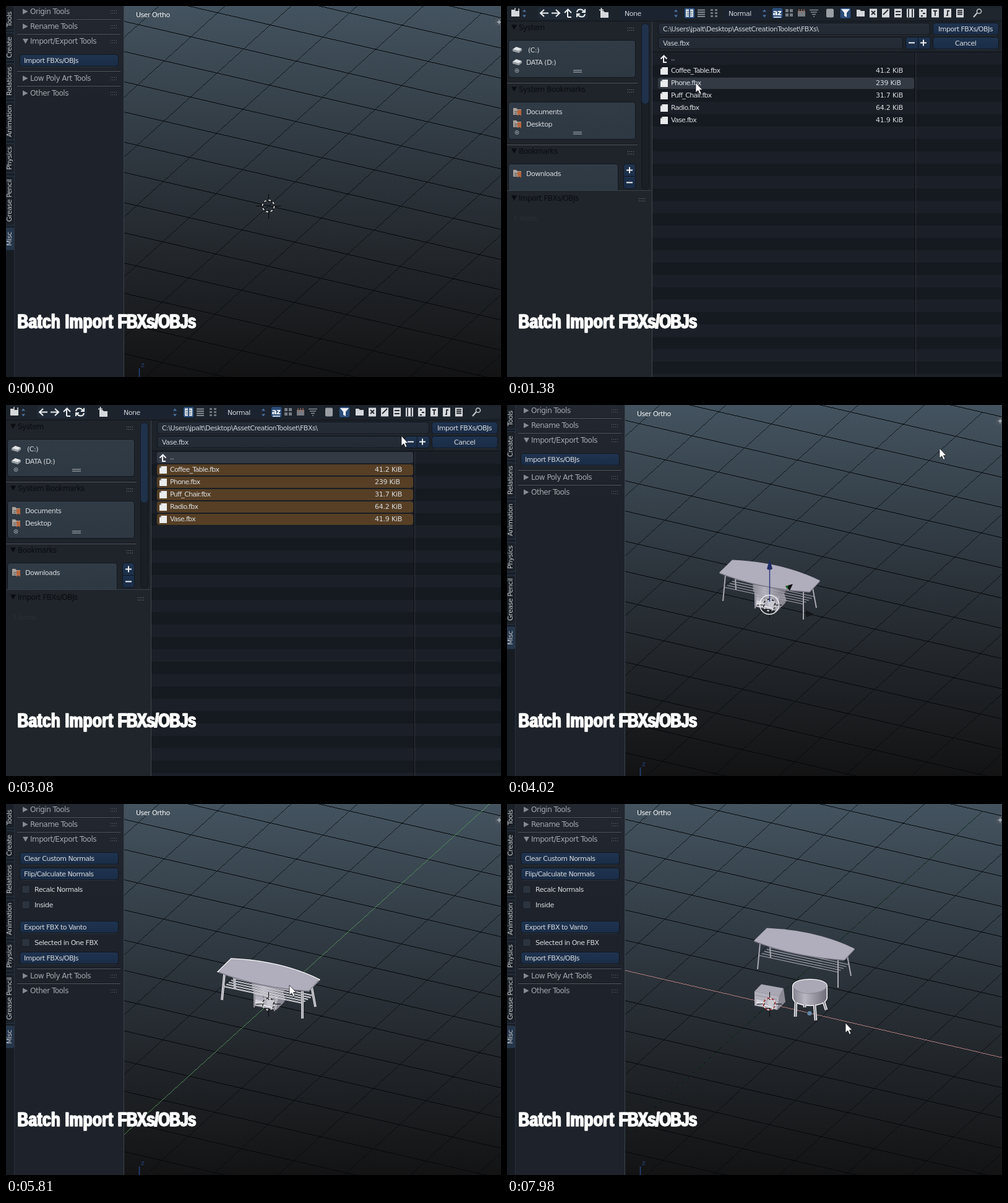
Recreate the animation shown at these times as an HTML page. Size 800 by 600 pixels, loop 8 s.

```html
<!DOCTYPE html>
<html lang="en">
<head>
<meta charset="utf-8">
<title>Batch import</title>
<style>
html, body { margin: 0; width: 100%; height: 100%; overflow: hidden; background: #1d222a; }
svg { display: block; width: 800px; height: 600px; }
text { font-family: "DejaVu Sans", sans-serif; white-space: pre; }
#title text { font-family: "Liberation Sans", sans-serif; font-weight: bold; }
</style>
</head>
<body>
<svg id="stage" viewBox="0 0 800 600" xmlns="http://www.w3.org/2000/svg"></svg>
<script>
const LOOP = 8000, TICK = 77.5;
const stage = document.getElementById('stage');

// ---------- markup helpers ----------
const rect = (x, y, w, h, fill, more = '') =>
  `<rect x="${x}" y="${y}" width="${w}" height="${h}" fill="${fill}" ${more}/>`;
const path = (d, fill, more = '') => `<path d="${d}" fill="${fill}" ${more}/>`;
const line = (d, color, w = 1, more = '') => path(d, 'none', `stroke="${color}" stroke-width="${w}" ${more}`);
const text = (x, y, s, fill = '#d8dbdf', size = 11, gap = -0.5, more = '') =>
  `<text x="${x}" y="${y}" fill="${fill}" font-size="${size}" letter-spacing="${gap}" ${more}>${s}</text>`;
const group = (id, body, more = '') => `<g id="${id}" ${more}>${body}</g>`;
const range = (n, f) => Array.from({ length: n }, (_, i) => f(i)).join('');
const fade = (id, ...stops) => `<linearGradient id="${id}" x2="0" y2="1">` +
  stops.map((c, i) => `<stop offset="${i / (stops.length - 1)}" stop-color="${c}"/>`).join('') + '</linearGradient>';

const button = (x, y, w, label, id = '', tx = 7) =>
  rect(x + .5, y + .5, w - 1, 19, 'url(#btn)', `rx="4" stroke="#10161f" ${id && `id="${id}"`}`) +
  line(`M${x + 4} ${y + 20.5}h${w - 8}`, '#2c333c') + text(x + tx, y + 14, label);
const grip = (x, y, c = '#6b7078') => range(8, i => rect(x + (i % 4) * 3, y + (i >> 2) * 4, 1, 1, c));
const fold = (x, y, open, c) => path(open ? `M${x} ${y - 4}h9l-4.5 8z` : `M${x} ${y - 4.5}v9l8.5-4.5z`, c);

// ---------- viewport ----------
const C = [424.5, 323.2], U = [85.15, 19.7], V = [43, -38.92];
const at = (a, b) => `${C[0] + a * U[0] + b * V[0]} ${C[1] + a * U[1] + b * V[1]}`;
// width = cosine of the slope, so each column gets exactly one pixel
const hair = (d, color, [dx, dy], more = '') =>
  line(d, color, Math.abs(dx) / Math.hypot(dx, dy), `shape-rendering="crispEdges" ${more}`);
const grid = () => hair(range(17, i => `M${at(-8, i - 8)}L${at(8, i - 8)}`), '#050709', U) +
  hair(range(17, i => `M${at(i - 8, -8)}L${at(i - 8, 8)}`), '#050709', V);

function tabs() {
  const list = [['Tools', -8, 39, 34], ['Create', 43, 88, 84], ['Relations', 93, 150, 145], ['Animation', 155, 217, 212],
    ['Physics', 222, 270, 265], ['Grease Pencil', 275, 355, 349], ['Misc', 359, 394, 388]];
  return rect(0, 0, 14, 600, '#171c23') + list.map(([s, a, b, y]) =>
    rect(-4, a, 17.5, b - a, s === 'Misc' ? '#25364b' : '#1b2027', 'rx="3" stroke="#2b3d51"') +
    text(0, 0, s, '#c3c7cc', 11, -.45, `transform="translate(9 ${y}) rotate(-90)"`)).join('') +
    line('M13.5 0V600', '#2a323d');
}

const header = (y, s, open) => fold(27, y - 4, open, '#868b92') + text(39, y, s, '#a3a8ae', 12) + grip(169, y - 6);
const rule = y => rect(18, y, 167, 1, '#565b62') + rect(18, y - 1, 167, 1, '#12161c');
const check = (y, s) => rect(25.5, y - 6.5, 13, 13, '#2b333e', 'rx="3" stroke="#151a21"') + text(46, y + 4, s);

const table = () => {
  const legs = 'M353 275L349 317M369 280L370 299M479 301V347M494 296L500 328';
  const rods = range(5, i => `M${352 + 4 * i} ${295 - 3.3 * i}L${479 + 4.5 * i} ${322 - 3 * i}`);
  const top = 'M343 271L364 250.5Q445 254 506 284L489 302Q405 296 343 271Z';
  return group('tableGlow', line(legs, '#fff', 3.6) + line(rods, '#fff', 1.8) + path(top, '#fff', 'stroke="#fff" stroke-width="2.4"')) +
    line(rods, '#a5a4ae', 1.1) + line(legs, '#aaa8b3', 2) +
    path(top, '#777581', 'transform="translate(0 1.5)"') + path(top, '#b0adbc');
};

const chair = () => {
  const legs = 'M402 303L401 329M416 306V314M432 309L434 335M446 302L451 318';
  const body = 'M397.500 279C399 266 450 266 451.500 279V299C448 314 401 314 397.500 299Z';
  return group('chairGlow', line(legs, '#fff', 4.6) + path(body, '#fff', 'stroke="#fff" stroke-width="3"')) +
    line(legs, '#8e8c97', 2.2) + path(body, 'url(#drum)') +
    path('M397.500 279C399 266 450 266 451.500 279C449 294 400 294 397.500 279Z', '#aba8b6') +
    line('M398 281C402 295 447 295 451 281', '#8b8994');
};

const radio = () =>
  path('M400 303L411 291.500L447 298L440 311Z', '#aaa7b4') + path('M440 311L447 298L450 320L437 333Z', '#8b8994') +
  path('M400 303L440 311L437 333L400 326Z', '#b4b2bd') + path('M403 316L416 319V325L403 322Z', '#d3d2da') +
  line('M402 309L436 316', '#8f8d98') + line('M403 322L434 330', '#f0f0f3', 1.5) +
  `<ellipse cx="427" cy="321" rx="6" ry="6" fill="#c9c8d1"/>`;

const gizmo = () => line('M424.500 318V266', '#25357f', 1.4) + path('M424.500 250L429 265Q424 268 420 265Z', '#202c66') +
  path('M450 293L462 289.500L457 300Z', '#0a0d0b') + path('M450 293L455 292L453 298Z', '#1c6b24') +
  path('M483 332L497 339L483 343Z', '#14161a') + `<circle cx="424" cy="323" r="15.5" fill="none" stroke="#f2f2f2" stroke-width="1.4"/>`;

const pivot = () => line('M404 323.500h13M431 323.500h13M424.500 304v13M424.500 330v14', '#06080a') +
  `<circle cx="424" cy="323.500" r="9.500" fill="none" stroke="#111" stroke-width="1.3"/>
   <circle id="ring" cx="424" cy="323.500" r="9.500" fill="none" stroke="#b02a2a" stroke-width="1.3"/>
   <circle cx="424" cy="323.500" r="9.500" fill="none" stroke="#fff" stroke-width="1.4" stroke-dasharray="3.730"/>`;

const scene = () => rect(0, 0, 800, 600, 'url(#sky)') + grid() +
  group('axisDim', hair(`M${at(0, -8)}L${at(0, 8)}`, '#10391a', V, 'stroke-dasharray="9 3"')) +
  group('axisY', hair(`M${at(0, -16)}L${at(0, 16)}`, '#69b56d', V)) +
  group('axisX', hair(`M${at(-8, 0)}L${at(8, 0)}`, '#b57f80', U)) +
  group('things', radio() + group('chair', chair()) + group('table', table())) +
  pivot() + group('gizmo', gizmo()) + `<circle id="origin" cx="424" cy="323.500" r="3.600" fill="#6485a6"/>` +
  text(210, 18, 'User Ortho', '#f4f5f6') + line('M215.500 586V600', '#24447f', 1.6) + text(218, 584, 'z', '#24447f', 11) +
  path('M800 19.500h-6q-4 0-4 4v5q0 4 4 4h6z', '#4a545e') + line('M797 22.500v7M793.500 26h7', '#aeb4ba', 1.6);

const sidePanel = () => rect(0, 0, 190, 600, '#1e232b') + rect(14, 0, 176, 160, 'url(#side)') + line('M190.500 0V600', '#3b434d') +
  tabs() + header(13, 'Origin Tools') + rule(21) + header(37, 'Rename Tools') + rule(45) + header(61, 'Import/Export Tools', true) +
  group('extra', button(22, 78, 160, 'Clear Custom Normals') + button(22, 103, 160, 'Flip/Calculate Normals') +
    check(138, 'Recalc Normals') + check(163, 'Inside') + button(22, 189, 160, 'Export FBX to Vanto') + check(224, 'Selected in One FBX')) +
  group('lower', button(22, 78, 160, 'Import FBXs/OBJs', 'importBtn') + rule(105) + header(121, 'Low Poly Art Tools') +
    rule(129) + header(145, 'Other Tools'));

// ---------- file browser ----------
const files = [['Coffee_Table', '41.2'], ['Phone', '239'], ['Puff_Chair', '31.7'], ['Radio', '64.2'], ['Vase', '41.9']];

const field = (x, y, w, h, s = '') => rect(x + .5, y + .5, w - 1, h - 1, 'url(#field)', 'rx="4" stroke="#10151b"') +
  line(`M${x + 4} ${y + h + .5}h${w - 8}`, '#2c3239') + text(x + 8, y + 14, s, '#cfd3d8');
const upDown = (x, y) => path(`M${x} ${y - 2}l3-4 3 4zM${x} ${y + 3}l3 4 3-4z`, '#4a6f9c');
const lit = x => rect(x - 9, 2.5, 18, 18, '#2b4d79', 'rx="3" stroke="#10161f"');
const page = (x, y, c = '#e9ebed') => path(`M${x + 3} ${y}h9v12h-12v-9z`, c) + path(`M${x + 3} ${y}v3h-3z`, '#8d9299');
const folder = (x, y, c = '#d5d8db') => path(`M${x} ${y}h5l2 2h6v9h-13z`, c);

function toolbar() {
  const arrows = 'M67 11.500H55M60 6l-6 5.500 6 5.500M72 11.500H84M79 6l6 5.500-6 5.500M98 18V6M93 11l5.500-5.500L104 11' +
    'M104 18H98M113 10q1-5 6-4.500 4 .5 6 4M126 5v5h-5M126 13q-1 5-6 4.500-4-.5-6-4M113 18v-5h5';
  const marks = ['M3 8l6 6M9 8l-6 6', 'M2 14l8-8', 'M2 9h8M2 14h8', 'M3 5v13M9 5v13',
    'M3 8h3M6 12h4M3 16h3', 'M3 8h6M6 8v8', 'M4 15h2V8h3', 'M2 7.500h8M2 10.500h8M2 13.500h8'];
  const kinds = folder(565, 6) + marks.map((d, i) => `<g transform="translate(${586 + 20 * i} 0)">` +
    rect(0, 4.5, 12, 14, '#d9dcdf') + line(d, '#23282f', 1.8) + '</g>').join('');
  return rect(0, 0, 800, 24, '#1d232b') + folder(7, 6) + line('M13 3v4M19 4v8', '#cfd3d7', 1.5) + upDown(25, 11.5) +
    rect(50, 2, 80, 19, '#202a36', 'rx="4"') + line(arrows, '#eceef0', 2) + folder(151, 8) + line('M149 6.500h7M152.500 3v7', '#eceef0', 1.6) +
    rect(183, 2, 97, 19, '#1b2330', 'rx="4"') + text(190, 16, 'None', '#d0d4d9') + upDown(270, 11.5) +
    lit(295) + range(2, i => rect(289 + 7 * i, 5.5, 5, 12, '#eceef0')) + line('M290 8.500h10M290 11.500h10M290 14.500h10', '#34506f') +
    line('M308 6.500h12M308 10h12M308 13.500h12M308 17h12', '#838990', 1.8) +
    range(6, i => rect(329 + (i % 2) * 7, 5 + (i >> 1) * 5, 4, 3, '#6f757c')) +
    rect(351, 2, 72, 19, '#1b2330', 'rx="4"') + text(358, 16, 'Normal', '#d0d4d9') + upDown(413, 11.5) +
    lit(437) + text(429.5, 15, 'az', '#fff', 12, -.5, 'font-weight="bold"') + line('M431 18h12', '#fff', 1.4) +
    range(4, i => rect(450 + (i % 2) * 7, 5 + (i >> 1) * 7, 5, 5, '#777c83')) +
    rect(470, 8, 12, 9, '#777c83') + line('M472 5v6M476 5v6M480 5v6', '#9a6a5a', 1.4) +
    line('M489 6.500h14M491 10h10M493 13.500h6M495 17h2', '#878c93', 1.6) +
    rect(516, 4.500, 12, 14, '#9ba0a6', 'rx="2"') + lit(547) + path('M540 5h14l-5 6v7l-4-2v-5z', '#f0f2f4') + kinds +
    rect(750, 2, 54, 19, '#20262e', 'rx="4"') + `<circle cx="763" cy="8.500" r="3.600" fill="none" stroke="#c9cdd2" stroke-width="1.5"/>` +
    line('M760 11l-6 7', '#c9cdd2', 2) + line('M0 24.500H800', '#11151a');
}

const INK = '#0a0c10';
const dimHead = (y, s, gx) => fold(7, y - 4.5, true, INK) + text(19, y, s, INK, 12) + grip(gx, y - 4, '#8b9097');
const box = (y, w, h) => rect(2.5, y + .5, w, h, 'url(#box)', 'rx="4" stroke="#12161c"');
const boxFoot = y => `<circle cx="16" cy="${y}" r="3" fill="none" stroke="#9aa0a7"/>` + line(`M14.500 ${y}h3M16 ${y - 1.5}v3`, '#9aa0a7') +
  line(`M107 ${y - .5}h14M107 ${y + 2.5}h14`, '#b5bac0');
const drive = y => path(`M9 ${y}l6-4 9 3-5 4z`, '#e2e4e6') + path(`M9 ${y}l10 3v3l-10-3zM19 ${y + 3}l5-4v3l-5 4z`, '#9aa0a6');
const mark = (y, s) => folder(10, y - 6, '#a9a29c') + path(`M17 ${y - 3}h6v10l-3-3-3 3z`, '#b8663c') +
  line(`M12 ${y}h5M12 ${y + 3}h4`, '#4b4642') + text(31, y + 4, s);
const shelfRule = y => rect(0, y, 211, 1, '#0f1318') + rect(0, y + 1, 211, 1, '#565b61');

const sidebar = () => rect(0, 24, 234, 576, '#1e242a') + dimHead(39, 'System', 195) + box(55, 205, 60) + drive(70) + drive(90) +
  text(34, 75, '(C:)') + text(31, 95, 'DATA (D:)') + boxFoot(104.5) + shelfRule(123) + dimHead(139, 'System Bookmarks', 195) +
  box(155, 205, 60) + mark(171, 'Documents') + mark(191, 'Desktop') + boxFoot(204.5) + shelfRule(223) + dimHead(239, 'Bookmarks', 195) +
  box(255, 177, 46) + mark(271, 'Downloads') +
  rect(188.5, 255.5, 19, 40, 'url(#btn)', 'rx="4" stroke="#10161f"') + line('M189 275.500h18', '#10161f') +
  line('M193 265.500h10M198 260.500v10M193 285.500h10', '#eef0f2', 2) +
  rect(217.5, 28.5, 12, 268, '#1a1f26', 'rx="6" stroke="#12161b"') + rect(217.5, 28.5, 12, 130, '#20324b', 'rx="6" stroke="#141b26"') +
  rect(0, 299, 234, 301, '#1f252a') + line('M0 298.500H234', '#3a4047') + dimHead(315, 'Import FBXs/OBJs', 213) +
  text(10, 347, '', '#2b3136', 11, -.3, 'id="count"') + rect(234, 24, 1, 576, '#3f454c');

const rowY = i => 76 + 20 * i;
const list = () => rect(235, 74, 565, 526, '#151a21') + range(14, i => rect(235, 75 + 40 * i, 565, 20, '#1b2028')) +
  range(6, i => rect(244, rowY(i), 414, 18, '#333a44', `rx="4" id="row${i}"`)) +
  line('M253 92V82M248.500 85.500l5-5 5 5M253 91h5', '#eef0f2', 2) + text(265, 88, '..') +
  files.map(([name, size], i) => page(248, rowY(i + 1) + 3) +
    text(265, rowY(i + 1) + 12, name + '.fbx', '#dadde1', 11, -.7) + text(596, rowY(i + 1) + 12, size + ' KiB', '#dadde1', 11, -.22)).join('') +
  rect(659, 75, 1, 525, '#07090c') + rect(660, 75, 1, 525, '#353b43');

const browser = () => rect(235, 24, 565, 50, '#1d2329') + list() + sidebar() + toolbar() +
  field(244, 27, 440, 20, 'C:\\Users\\jpalt\\Desktop\\AssetCreationToolset\\FBXs\\') + field(244, 50, 396, 20, 'Vase.fbx') +
  rect(644.5, 50.5, 40, 19, 'url(#btn)', 'rx="4" stroke="#10161f"') + line('M664.500 51v18', '#10161f') +
  line('M649 59.500h10M668 59.500h10M673 54.500v10', '#eef0f2', 2) +
  button(688, 27, 107, 'Import FBXs/OBJs', 'okBtn', 9) + button(688, 50, 107, 'Cancel', '', 36) + line('M235 74.500H800', '#0d1116');

// ---------- title: two copies side by side thicken the stems ----------
const title = () => [17.8, 19.2].map(x =>
  `<text transform="translate(${x} 521) scale(.77 1)" fill="#fff" stroke="#fff" stroke-width=".9" font-size="31.5"
    letter-spacing=".6">Batch Import <tspan letter-spacing="-.9">FBXs/OBJs</tspan></text>`).join('');

// ---------- assemble ----------
stage.innerHTML = `<defs>${fade('sky', '#43535f', '#2a3138', '#131314')}${fade('side', '#222730', '#1e232b')}
  ${fade('btn', '#1f3450', '#1a2c46')}${fade('btnHot', '#2f4c74', '#294467')}${fade('btnDown', '#4a72a8', '#39598a')}
  ${fade('field', '#252d38', '#232a33')}${fade('box', '#313b46', '#2e3842')}
  <linearGradient id="drum"><stop stop-color="#85838e"/><stop offset=".35" stop-color="#b9b7c2"/><stop offset="1" stop-color="#6f6d78"/></linearGradient></defs>` +
  group('viewport', scene() + sidePanel()) + group('browser', browser()) + group('title', title()) +
  group('mouse', path('M0 0V16L3.800 12.600L6.400 18.400L9 17.200L6.400 11.700H11Z', '#fff', 'stroke="#15181c" stroke-width=".8"'));

const el = {};
stage.querySelectorAll('[id]').forEach(n => el[n.id] = n);
const show = (id, on) => el[id].setAttribute('display', on ? 'inline' : 'none');
const move = (id, x, y) => el[id].setAttribute('transform', `translate(${x} ${y})`);
const paint = (id, fill) => el[id].setAttribute('fill', fill);

// ---------- timeline, in ticks ----------
const route = [[2, 551, 556], [11, 81, 88], [15, 81, 88], [18, 305, 124], [23, 409, 231], [31, 409, 231], [40, 639, 50],
  [42, 676, 49], [45, 704, 38], [50, 704, 38], [52, 699, 70], [56, 699, 70], [64, 469, 279], [65, 469, 279], [68, 458, 293],
  [75, 458, 293], [79, 514, 243], [82, 514, 243], [92, 464, 326], [95, 478, 335], [96, 478, 335], [103, 547, 354]];

const ease = (n, a, b) => {
  const u = Math.min(1, Math.max(0, (n - a) / (b - a)));
  return u * u * (3 - 2 * u);
};
function mouseAt(n) {
  const i = Math.max(1, route.findIndex(k => k[0] >= n));
  const [a, x, y] = route[i - 1], [b, x2, y2] = route[i], u = ease(n, a, b);
  return [x + (x2 - x) * u, y + (y2 - y) * u];
}

function draw(ms) {
  const n = Math.min(103, Math.floor((ms % LOOP + 22) / TICK));
  const within = (a, b) => n >= a && n < b;
  const [mx, my] = mouseAt(n);
  show('mouse', n >= 2);
  move('mouse', mx, my);

  const browsing = within(13, 50);
  show('browser', browsing);
  show('viewport', !browsing);

  if (browsing) {
    const picked = within(27, 29) || n >= 32;
    const hover = mx < 244 ? -1 : n > 31 && my < 76 ? 0 : Math.floor((my - 75) / 20);
    for (let i = 0; i < 6; i++) {
      const on = picked && i > 0;
      show('row' + i, on || i === hover);
      paint('row' + i, on ? (i === hover ? '#6b5033' : '#563f25') : '#333a44');
    }
    el.count.textContent = (within(29, 32) ? 1 : 5) + ' items';
    paint('okBtn', n >= 47 ? 'url(#btnDown)' : n >= 43 ? 'url(#btnHot)' : 'url(#btn)');
    return;
  }

  const wide = n >= 67, slide = ease(n, 75, 79), push = ease(n, 96, 103);
  show('extra', wide);
  move('lower', 0, wide ? 161 : 0);
  paint('importBtn', n === 12 ? 'url(#btnDown)' : within(9, 12) ? 'url(#btnHot)' : 'url(#btn)');
  show('things', n >= 50);
  move('table', 56 * slide, -50 * slide);
  move('chair', 65 * push, 15 * push);
  show('tableGlow', within(66, 92));
  show('chairGlow', n >= 92);
  show('axisY', within(71, 82));
  show('axisDim', n >= 82);
  show('axisX', n >= 97);
  show('ring', n >= 82);
  show('origin', n >= 97);
  move('origin', 65 * push, 15 * push);
  show('gizmo', within(50, 70) || within(82, 97));
  const moved = within(82, 92) ? 1 : 0;
  move('gizmo', 56 * moved, -50 * moved);
}

const start = performance.now();
(function loop() {
  draw(performance.now() - start);
  requestAnimationFrame(loop);
})();
</script>
</body>
</html>
```
